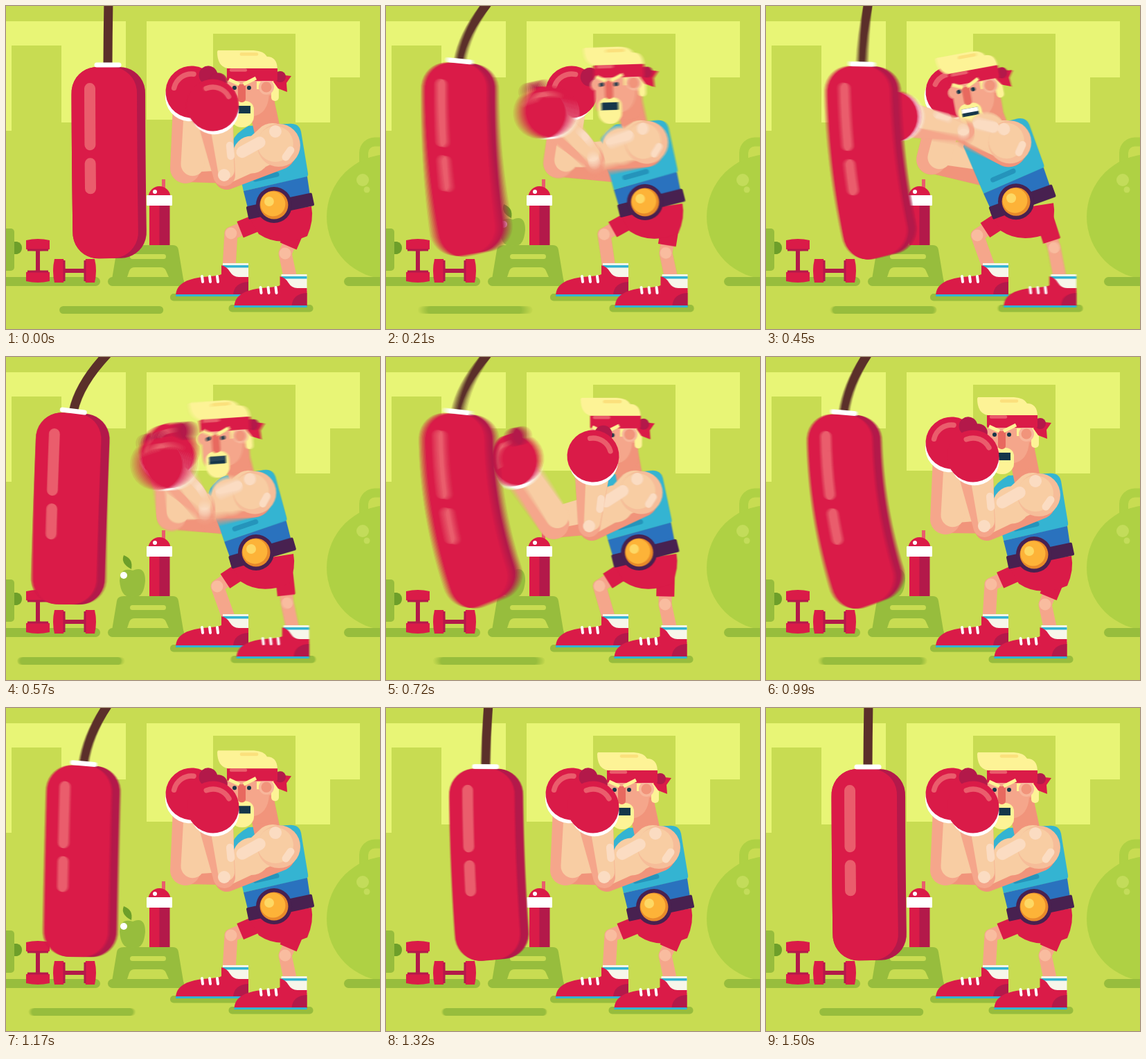
Write an HTML page with a canvas that moves like this. It is 540x466 px and loops after 1.53 s.

```html
<!DOCTYPE html>
<html>
<head>
<meta charset="utf-8">
<title>Boxing workout</title>
<style>
html, body { margin: 0; width: 100%; height: 100%; overflow: hidden; background: #c8dc52; }
canvas { display: block; width: 540px; height: 466px; }
</style>
</head>
<body>
<canvas id="stage" width="540" height="466"></canvas>
<script>
const LOOP = 1530, STEP = 30, SHUTTER = 20, SAMPLES = 10;
const RAD = Math.PI / 180;
const C = {
  bg: '#c8dc52', pale: '#e8f576', green: '#97bd3d', leaf: '#6d9f2a', bell: '#afd144',
  red: '#da1b48', dark: '#b3194a', pink: '#ea5d6c', white: '#ffffff', rope: '#5b2f2a',
  skin: '#f5a68b', shade: '#f1947b', light: '#f8cda3', glow: '#fbdcc2',
  hair: '#fdf396', gold: '#fdb338', tank: '#34b4d2', navy: '#2a72be', belt: '#482150', ink: '#15364a'
};

const screen = document.getElementById('stage').getContext('2d');
const buffer = document.createElement('canvas');
buffer.width = 540;
buffer.height = 466;
const g = buffer.getContext('2d');

// ---- drawing helpers ----
function poly(color, ...pts) {
  g.fillStyle = color;
  g.beginPath();
  for (const [x, y] of pts) g.lineTo(x, y);
  g.closePath();
  g.fill();
}
function box(color, x, y, w, h, r = 0) {
  g.fillStyle = color;
  g.beginPath();
  g.roundRect(x, y, w, h, r);
  g.fill();
}
function disc(color, x, y, r) {
  g.fillStyle = color;
  g.beginPath();
  g.arc(x, y, r, 0, 7);
  g.fill();
}
function line(color, width, pts, cap = 'round') {
  g.strokeStyle = color;
  g.lineWidth = width;
  g.lineCap = cap;
  g.lineJoin = 'round';
  g.beginPath();
  for (const [x, y] of pts) g.lineTo(x, y);
  g.stroke();
}
function shape(color, path) {
  g.fillStyle = color;
  g.fill(new Path2D(path));
}
function at(x, y, degrees, draw) {
  g.save();
  g.translate(x, y);
  g.rotate(degrees * RAD);
  draw();
  g.restore();
}
// Tapered limb with round ends.
function limb(color, a, b, wa, wb) {
  const side = Math.atan2(b[1] - a[1], b[0] - a[0]) + Math.PI / 2;
  g.fillStyle = color;
  g.beginPath();
  g.arc(...a, wa / 2, side, side + Math.PI);
  g.arc(...b, wb / 2, side + Math.PI, side + 2 * Math.PI);
  g.fill();
}
const mix = (a, b, k) => [a[0] + (b[0] - a[0]) * k, a[1] + (b[1] - a[1]) * k];
const add = (a, x, y) => [a[0] + x, a[1] + y];
const turn = ([x, y], degrees) => {
  const c = Math.cos(degrees * RAD), s = Math.sin(degrees * RAD);
  return [x * c - y * s, x * s + y * c];
};

// ---- motion: cosine easing between turning points [time, value] ----
function ease(turns, t) {
  const next = turns.findIndex(([time]) => time > t);
  if (next < 0) return turns[turns.length - 1][1];
  const [t0, a] = turns[next - 1], [t1, b] = turns[next];
  return a + (b - a) * (1 - Math.cos(Math.PI * (t - t0) / (t1 - t0))) / 2;
}
const weight = [[0, 0], [120, .8], [280, .3], [450, 1], [655, 1], [900, 0]];
const nearPunch = [[0, 0], [120, 1], [320, 0], [465, 1], [500, 1], [660, 0]];
const farPunch = [[0, 0], [500, 0], [680, 1], [850, 0]];
const breath = [[0, 0], [210, 1], [450, .4], [850, 1], [990, 1], [1330, 0]];
const bagTop = [[0, 0], [105, 0], [240, 46], [405, 0], [575, 50], [655, 10], [745, 50], [890, 18], [1070, 46], [1380, -1], [1500, 0]];
const bagEnd = [[0, 0], [110, 0], [150, -10], [275, 56], [440, -23], [585, 63], [690, -12], [820, 60], [950, -16], [1120, 50], [1350, -8], [1500, 0]];

// ---- room ----
function drawRoom() {
  box(C.bg, 0, 0, 540, 466);
  poly(C.pale, [0, 22], [173, 22], [173, 103], [130, 103], [130, 168], [80, 168], [80, 57], [8, 57], [8, 180], [0, 180]);
  poly(C.pale, [203, 22], [511, 22], [511, 103], [468, 103], [468, 168], [418, 168], [418, 40], [299, 40], [299, 164], [203, 164]);

  g.strokeStyle = C.bell;
  g.lineWidth = 13;
  g.beginPath();
  g.roundRect(516.5, 196, 74, 60, 16);
  g.stroke();
  disc(C.bell, 553, 304, 90);
  disc('#c3dc5a', 515, 251, 9);
  disc('#c3dc5a', 521, 265, 4.5);

  for (const [x, w] of [[-20, 156], [147, 110], [488, 80]]) box(C.green, x, 391, w, 13, 6.5);
  shape(C.green, 'M170 345H241Q248 345 249 352L256 394H153L160 352Q161 345 170 345Z');
  box(C.bg, 179, 358, 52, 7, 3.5);
  shape(C.bg, 'M175 391L178 382Q180 377 186 377H223Q229 377 231 382L235 391Z');

  box(C.green, -8, 321, 20, 61, 5);
  shape(C.leaf, 'M12 340H16Q23 342 23 349T16 358H12Z');
  drawWeights();

  shape(C.green, 'M183 308Q201 300 201 323Q199 346 187 346Q183 344 179 346Q166 346 164 323Q165 302 183 308Z');
  shape(C.leaf, 'M181 306Q165 298 170 286Q184 291 181 306Z');
  disc(C.white, 170, 315, 5);

  line(C.pink, 5, [[227.5, 250], [227.5, 265]], 'butt');
  disc(C.red, 221.5, 276, 16);
  box(C.red, 207, 285, 15, 60);
  box(C.dark, 221.5, 285, 15, 60);
  box(C.white, 203, 273, 37, 15, 1);
  disc(C.white, 215, 268, 3);
}
function drawDumbbell(length) {
  box(C.dark, -3, 10, 6, length - 20);
  for (const end of [0, 1]) {
    g.save();
    if (end) {
      g.translate(0, length);
      g.scale(1, -1);
    }
    shape(C.red, 'M-17 2Q0 -2 17 2V15Q0 20 -17 15Z');
    line(C.dark, 3, [[-15, 16], [15, 16]], 'butt');
    g.restore();
  }
}
function drawWeights() {
  at(46, 336, 0, () => drawDumbbell(63));
  at(68, 382, -90, () => drawDumbbell(62));
}

// ---- punching bag, bent along its spine ----
function drawBag(t) {
  const LEN = 279, R = 37;
  const swing = ease(bagTop, t);
  const x = 147 - swing, y = 85 - swing * .14;
  const shift = 149.5 - ease(bagEnd, t) - x;
  const tilt = swing * .05 * RAD, bend = -2 * (shift / LEN + tilt) / LEN;
  const point = (s, u) => {
    const a = tilt + bend * s, drift = tilt * s + bend * s * s / 2;
    return [x - drift + u * Math.cos(a), y + s - drift * drift / (2 * LEN) + u * Math.sin(a)];
  };
  const hull = (color, left, right) => {
    const a = [], b = [];
    for (let i = 0; i <= 40; i++) {
      const s = 3 + (LEN - 3) * (1 - Math.cos(Math.PI * i / 40)) / 2;
      const d = Math.max(0, R - Math.min(s - 3, LEN - s));
      const inset = R - Math.sqrt(R * R - d * d);
      a.push(point(s, left + inset));
      b.unshift(point(s, right - inset));
    }
    poly(color, ...a, ...b);
  };
  const streak = (from, to) => line(C.pink, 16, [0, .25, .5, .75, 1].map(k => point(from + (to - from) * k, -26)));

  box(C.green, x + shift * .87 - 72, 433, 150, 11, 5.5);
  g.strokeStyle = C.rope;
  g.lineWidth = 13;
  g.lineCap = 'butt';
  g.beginPath();
  g.moveTo(148, -6);
  g.quadraticCurveTo(x + (148 - x) * .17, 38, ...point(0, 0));
  g.stroke();
  hull(C.dark, -52.5, 54);
  hull(C.red, -52.5, 42);
  line(C.white, 7, [[x - 16, y - swing * .04], [x + 16, y + swing * .04]]);
  streak(34, 115);
  streak(142, 178);
}

// ---- fighter ----
function drawShoe(dx, dy) {
  g.save();
  g.translate(dx, dy + 1);
  box(C.green, 237, 414, 122, 10.5, 5);
  box('#f7f6ea', 313, 370, 37, 24);
  box(C.tank, 313, 373, 37, 3.5);
  shape(C.red, 'M245 416C246 403 255 396 272 392C290 388 304 390 311 386V373Q319 375 323 382Q328 390 336 390H350V416Z');
  shape(C.dark, 'M350 397Q329 398 328 416H350Z');
  box(C.tank, 245, 415, 105, 3);
  for (const x of [283, 294, 305]) line(C.white, 4, [[x, 389], [x + 1, 397]]);
  g.restore();
}
function drawLeg(hip, knee, ankle, cut, width) {
  line(C.skin, 19, [hip, knee, ankle]);
  disc('#f9bc9f', ...knee, 8.5);
  line(C.red, width, [hip, mix(hip, knee, cut)], 'butt');
}
function drawGlove([x, y], angle, near) {
  at(x, y, angle, () => {
    disc(C.white, near ? 1 : -2, 7, 35.5);
    if (near) disc(C.dark, 13, -32, 13);
    disc(C.red, 0, 0, 37.5);
    if (!near) disc(C.dark, 22, -26, 13.5);
    const from = near ? -103 : -172;
    g.strokeStyle = C.pink;
    g.lineWidth = 7.5;
    g.lineCap = 'round';
    g.beginPath();
    g.arc(0, 0, 26, from * RAD, (from + 84) * RAD);
    g.stroke();
  });
}
function drawForearm(elbow, glove, near) {
  const dx = glove[0] - elbow[0], dy = glove[1] - elbow[1], len = Math.hypot(dx, dy);
  const spot = (along, side) => [
    elbow[0] + dx * along - dy / len * side,
    elbow[1] + dy * along + dx / len * side
  ];
  limb(C.skin, spot(0, 0), spot(.75, 0), near ? 32 : 44, 50);
  limb(C.light, spot(.06, near ? 4 : 10), spot(.75, 8), near ? 24 : 34, 34);
  if (near) {
    line(C.glow, 11, [spot(.25, 14), spot(.4, 15)]);
    disc(C.glow, ...spot(0, 0), 9);
  }
  drawGlove(glove, Math.atan2(dy, dx) / RAD + 90, near);
}
function drawFarArm(shoulder, elbow, glove) {
  limb(C.shade, shoulder, elbow, 56, 40);
  limb(C.light, add(shoulder, 0, -14), add(elbow, 6, -10), 40, 32);
  drawForearm(elbow, glove, false);
}
function drawNearArm(shoulder, elbow, glove, lean) {
  limb(C.shade, add(shoulder, -2, 9), add(elbow, 4, 3), 54, 36);
  limb(C.light, add(shoulder, -9, -4), add(elbow, 0, -1), 56, 30);
  disc(C.light, ...add(mix(shoulder, elbow, .5), 0, -8), 27);
  disc('#f6bd99', ...shoulder, 31);
  disc(C.light, ...add(shoulder, -5, -2), 26);
  line(C.glow, 17, [.3, .62].map(k => add(mix(shoulder, elbow, k), -4, -17)));
  at(...shoulder, lean, () => {
    disc(C.glow, -5, -20, 9);
    line(C.glow, 11, [[17, 7], [10, 17]]);
  });
  drawForearm(elbow, glove, true);
}
function drawTorso(x, y, lean) {
  at(x, y, lean, () => {
    shape(C.tank, 'M-44 -20L-60 -92Q-55 -104 -37 -114L20 -117Q36 -119 39 -106L49 -46Q50 -41 46 -40Z');
    line('#2594bb', 7, [[-27, -37], [4, -44]]);
    poly(C.navy, [-44, -20], [48, -41], [52, -14], [-38, 4]);
  });
}
function drawBelt(x, y, lean) {
  at(x, y, lean * .75 - 12, () => box(C.belt, -40, -6, 97, 19, 2));
  disc(C.belt, x, y, 26);
  disc('#e8892a', x, y, 20.5);
  disc(C.gold, x - 1.5, y - 1.5, 18);
  disc('#fdd865', x - 7, y - 5, 7);
}
function drawHead([x, y], tilt) {
  at(x, y, tilt, () => {
    disc(C.skin, -53, 1, 9);
    box(C.skin, -56, -20, 68, 68, [4, 4, 18, 20]);
    shape(C.shade, 'M12 12V40Q6 56 -18 52V42Q2 38 4 12Z');
    box(C.hair, -14, -8, 30, 11);
    box(C.hair, 7, -9, 11, 29, 5);
    disc('#f8b69b', 0, 0, 11);
    disc(C.shade, 0, 0, 7.5);
    box(C.hair, -52, 20, 34, 38, [12, 12, 16, 16]);
    box(C.ink, -47, 27, 24, 11);
    if (tilt < -5) box(C.white, -47, 27, 24, 6);
    box('#e8695f', -41, -4, 11, 26, [2, 2, 5, 5]);
    disc(C.ink, -46, 1, 3);
    disc(C.ink, -25, 1, 3);
    poly(C.red, [18, -18], [36, -16], [29, -6], [30, 7], [17, 2], [10, -8]);
    disc(C.dark, 20, -15, 8);
    box(C.red, -57, -29, 73, 20, 2);
    line(C.pink, 4.5, [[-51, -24.5], [-30, -24.5]]);
    line(C.hair, 5, [[-54, -11], [-39, -4]], 'butt');
    line(C.hair, 5, [[-33, -4], [-15, -13]], 'butt');
    shape(C.hair, 'M-70 -53H-18Q-3 -52 1 -44Q15 -44 16 -27H-56Q-71 -30 -71 -51Z');
    line('#fbe07c', 4.5, [[-36, -47.5], [-14, -47.5]]);
  });
}
function drawFighter(t) {
  const w = ease(weight, t), near = ease(nearPunch, t), far = ease(farPunch, t), rise = ease(breath, t);
  const lunge = near * near * w;
  const foot = 15 * lunge ** 1.5;
  const lean = -3 * w - 8 * lunge;
  const hx = 387 - 26 * w, hy = 287 - 2 * rise - 4 * w;
  const head = [376 - 29 * w - 25 * lunge, 117 - 6 * rise];
  const joint = offset => add(turn(offset, lean), hx, hy);

  drawFarArm(joint([-35, -58]), [259 - 20 * w, 234 - 13 * near + 8 * far], [268 - 96 * far, 124 + 28 * far]);
  drawLeg([hx - 15, hy + 22], [325 - 20 * w, 328 + 3 * w], [322, 378], .72, 25);
  drawShoe(0, 0);
  drawLeg([hx + 39, hy + 17], [403 + foot * .95, 357 - foot * .6], [411 + foot, 394], .8, 26);
  drawShoe(84.5 + foot, 16);
  at(hx, hy, 0, () => shape(C.red, 'M-37 16L54 2Q58 22 48 45Q8 62 -22 42Z'));
  drawTorso(hx, hy, lean);
  drawBelt(hx, hy, lean);
  line(C.shade, 38, [add(head, -7, 24), joint([-8, -100])]);
  drawHead(head, -11 * lunge);
  drawNearArm(joint([7, -86]), [315 - 26 * w - 4 * near, 244 - 67 * near * near], [299 - 119 * near, 143 + 17 * near], lean);
}

function drawScene(t) {
  drawRoom();
  drawFighter(t);
  drawBag(t);
}

let shown = -1;
function render(now) {
  const time = Math.floor(now % LOOP / STEP) * STEP;
  if (time === shown) return;
  shown = time;
  // Average a few moments for motion blur.
  for (let i = 0; i < SAMPLES; i++) {
    const offset = (i / (SAMPLES - 1) - .5) * SHUTTER;
    drawScene((time + offset + LOOP) % LOOP);
    screen.globalAlpha = 1 / (i + 1);
    screen.drawImage(buffer, 0, 0);
  }
}
const start = performance.now();
function tick() {
  render(performance.now() - start);
  requestAnimationFrame(tick);
}
tick();
</script>
</body>
</html>
```
